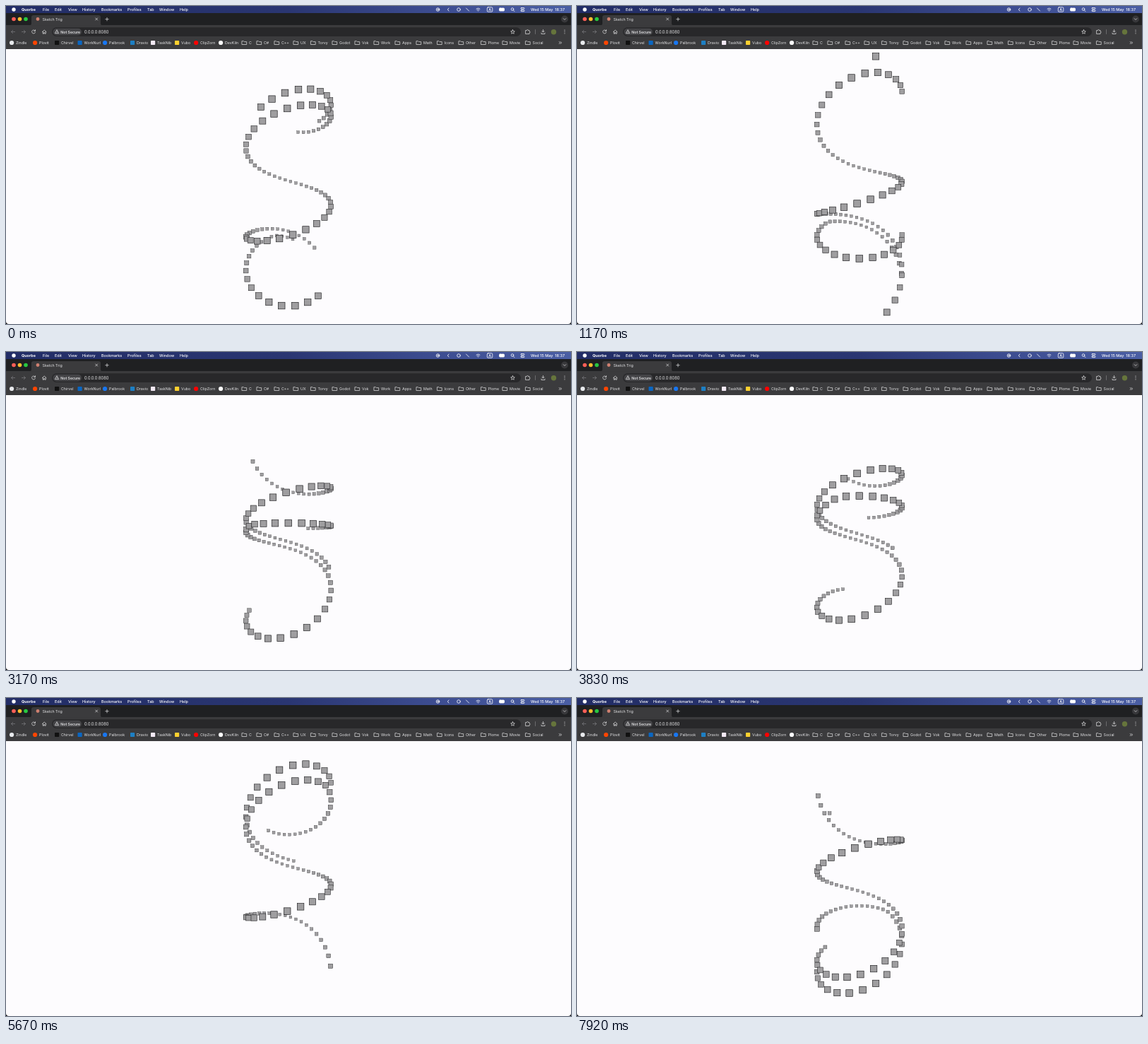
An HTML page with a canvas that plays this animation: 800x450 px, repeating every 8000 ms.

```html
<!DOCTYPE html>
<html lang="en">
<head>
<meta charset="utf-8">
<title>Spiral of squares</title>
<style>
  html, body { margin: 0; width: 100%; height: 100%; overflow: hidden; background: #fdfcfe; }
  svg, canvas { position: absolute; left: 0; top: 0; display: block; }
  text { font: 5.3px Inter, Roboto, sans-serif; fill: #e4e4e6; white-space: pre; }
  .menu text { font-size: 5.45px; fill: #fff; font-weight: 500; }
  .menu .app { font-weight: 700; }
  .line { fill: none; stroke: #d2d2d4; stroke-width: .8; stroke-linecap: round; stroke-linejoin: round; }
  .dim { stroke: #77777a; }
</style>
</head>
<body>
<canvas id="stage" width="800" height="450"></canvas>
<svg width="800" height="450" viewBox="0 0 800 450">
  <defs>
    <linearGradient id="bar">
      <stop offset="0" stop-color="#222d66"/>
      <stop offset=".5" stop-color="#2a3672"/>
      <stop offset=".75" stop-color="#3c4c90"/>
      <stop offset="1" stop-color="#4a5ea4"/>
    </linearGradient>
  </defs>
  <rect width="800" height="10" fill="url(#bar)"/>
  <rect y="10" width="800" height="17.5" fill="#1f2022"/>
  <rect y="27" width="800" height="34" fill="#3b3b3d"/>
  <path d="M33 27.5q3 0 3-3V16q0-3 3-3h92q3 0 3 3v8.500q0 3 3 3z" fill="#3b3b3d"/>

  <g class="menu" id="menu">
    <circle cx="11" cy="5" r="2.7" fill="#fff"/>
    <g class="line" style="stroke:#fff">
      <circle cx="611.500" cy="5" r="2.300"/>
      <circle cx="611.500" cy="5" r=".8"/>
      <path d="M627 3l-1.700 2 1.700 2M651.500 3l4 4M666 4q2.500-2 5 0M667 5.700q1.500-1.200 3 0M668.500 7.200v0"/>
      <circle cx="641" cy="5" r="2.300"/>
      <rect x="681.300" y="1.800" width="7.500" height="6.400" rx="1.300"/>
      <rect x="698.500" y="3" width="7" height="4" rx="1" fill="#fff"/>
      <circle cx="717" cy="4.500" r="1.800"/>
      <path d="M718.400 6l1.500 1.600"/>
      <rect x="729" y="2.500" width="5" height="1.800" rx=".9"/>
      <rect x="729" y="5.800" width="5" height="1.800" rx=".9"/>
    </g>
    <text x="683.200" y="7">A</text>
    <text x="743" y="7">Wed 15 May  18:37</text>
  </g>

  <circle cx="11" cy="18.500" r="2.800" fill="#ff5f57"/>
  <circle cx="19.500" cy="18.500" r="2.800" fill="#febc2e"/>
  <circle cx="28" cy="18.500" r="2.800" fill="#28c840"/>
  <circle cx="45" cy="18.500" r="2.400" fill="#d08070"/>
  <text x="51.500" y="20.500">Sketch Trig</text>
  <path class="line" d="M126.700 17l3 3m0-3l-3 3M143 16.500v4.400m-2.200-2.200h4.400"/>
  <circle cx="791" cy="18.500" r="5" fill="#38383b"/>
  <path class="line" d="M789.200 17.700l1.800 1.800 1.800-1.800"/>

  <path class="line dim" d="M12.500 36.500h-5m2.200-2.200l-2.200 2.200 2.200 2.200M22.500 36.500h5m-2.200-2.200l2.200 2.200-2.200 2.200"/>
  <path class="line" d="M41.200 35a2.500 2.500 0 1 0 .3 2.300M41.500 33.700v1.800h-1.800M51.500 36.500l2.700-2.500 2.700 2.500M52.200 36.200v3h1.300v-1.500h1.400v1.500h1.300v-3"/>
  <rect x="65" y="30.300" width="664" height="12.600" rx="6.300" fill="#28282a"/>
  <rect x="66.500" y="31.700" width="40.500" height="9.800" rx="4.900" fill="#444447"/>
  <path class="line" d="M72.200 34l2.500 4.600h-5zM72.200 36v1"/>
  <text x="77.300" y="38.500" style="font-size:5.200px;font-weight:600">Not Secure</text>
  <text x="111" y="38.600" style="font-size:5.700px">0.0.0.0:8080</text>
  <path class="line" d="M717.500 33.700l.8 1.900 2 .2-1.500 1.400.4 2-1.700-1-1.700 1 .4-2-1.500-1.400 2-.2z"/>
  <path class="line" d="M736 34.500h1.500a1 1 0 0 1 2 0h1.500v1.500a1 1 0 0 1 0 2v1.500h-5z"/>
  <path class="line" d="M749.500 33.500v6" stroke-opacity=".4"/>
  <path class="line" d="M760.500 33.500v3.500m-1.700-1.700l1.700 1.700 1.700-1.700M758 38v1.500h5V38"/>
  <circle cx="775.500" cy="36.800" r="3.700" fill="#66753c"/>
  <path d="M791 34.200v0m0 2.300v0m0 2.300v0" class="line" style="stroke-width:1.200"/>
  <g id="marks"></g>
  <path class="line" d="M783.200 50.500l1.500 1.500-1.500 1.500m2-3l1.500 1.500-1.500 1.500"/>
  <path d="M0 446v4h4q-4 0-4-4zM800 446v4h-4q4 0 4-4z" fill="#000"/>
</svg>
<script>
const NS = 'http://www.w3.org/2000/svg';
const add = (parent, tag, attrs, text = '') => {
  const el = document.createElementNS(NS, tag);
  for (const name in attrs) el.setAttribute(name, attrs[name]);
  el.textContent = text;
  parent.append(el);
};
const byId = id => document.getElementById(id);

const menu = [[22, 'Quorbe'], [52, 'File'], [69, 'Edit'], [88, 'View'], [108, 'History'],
  [135, 'Bookmarks'], [172, 'Profiles'], [200, 'Tab'], [217, 'Window'], [246, 'Help']];
menu.forEach(([x, label], i) =>
  add(byId('menu'), 'text', { x, y: 7, class: i ? '' : 'app' }, label));

// Each site: text position, label, icon colour, icon corner radius.
const ROUND = 3.1, SQUARE = 0.8;
const sites = [[14, 'Zindle', '#e8eaed', ROUND], [47, 'Plovit', '#ff4500', ROUND],
  [78, 'Chirvel', '#111', SQUARE], [110.5, 'WorkNurl', '#0a66c2', SQUARE],
  [146, 'Palbrook', '#1877f2', ROUND], [185, 'Dravio', '#1d7fc4', SQUARE],
  [214, 'TaskNib', '#f3e9f5', SQUARE], [248, 'Vubo', '#ffd02f', SQUARE],
  [275, 'ClipZorn', '#f00', ROUND], [310, 'DevKiln', '#fff', ROUND]];
const folders = [[344, 'C'], [365, 'C#'], [390, 'C++'], [417, 'UX'], [441.5, 'Torvy'],
  [472, 'Godot'], [504, 'Vok'], [531, 'Work'], [561, 'Apps'], [591, 'Math'], [620.5, 'Icons'],
  [651, 'Other'], [682.5, 'Plome'], [713, 'Movie'], [745.5, 'Social']];
const marks = byId('marks');
for (const [x, label, fill, rx] of sites) {
  add(marks, 'rect', { x: x - 9, y: 48.9, width: 6.2, height: 6.2, rx, fill });
  add(marks, 'text', { x, y: 54 }, label);
}
for (const [x, label] of folders) {
  add(marks, 'path', { class: 'line', d: `M${x - 9.7} 49.700h2.200l.9.900h3.300v3.900h-6.400z` });
  add(marks, 'text', { x, y: 54 }, label);
}

// A helix of squares turns and rises; those passing the top re-enter below.
const COUNT = 100, SIDE = 100, RADIUS = 1000, DEPTH = 2000, FOCAL = 300;
const TOP = -2000, CYCLE = 4010;
const SCALE = 800 / 1920, CENTER = { x: 400, y: 255.5 };
const FPS = 12, LOOP = 8000;
const SPIN = 0.05, RISE = 50, START_ANGLE = -1.073, START_Y = 1760;

const mod = (a, n) => (a % n + n) % n;
const wrap = y => mod(y - TOP, CYCLE) + TOP;
const ctx = byId('stage').getContext('2d');

function squareAt(k, step) {
  const angle = START_ANGLE + SPIN * step - 0.2 * (k - 1);
  // The first squares share one height, as a flat ring.
  const offset = Math.max(0, 60 * k - 1000);
  const z = DEPTH + Math.sin(angle) * RADIUS;
  const zoom = SCALE * FOCAL / (FOCAL + z);
  return {
    z,
    size: SIDE * zoom,
    x: CENTER.x + Math.cos(angle) * RADIUS * zoom,
    y: CENTER.y + wrap(START_Y + offset - RISE * step) * zoom
  };
}

function draw(step) {
  ctx.fillStyle = '#fdfcfe';
  ctx.fillRect(0, 0, 800, 450);
  ctx.fillStyle = '#9f9ea0';
  ctx.strokeStyle = '#1c1c1e';
  const squares = Array.from({ length: COUNT }, (_, i) => squareAt(i + 1, step));
  squares.sort((a, b) => b.z - a.z);
  for (const { x, y, size } of squares) {
    const box = [x - size / 2, y - size / 2, size, size];
    ctx.lineWidth = size * 0.07;
    ctx.fillRect(...box);
    ctx.strokeRect(...box);
  }
}

const begin = performance.now();
function tick() {
  const ms = (performance.now() - begin) % LOOP;
  draw(Math.floor((ms + 4) * FPS / 1000));
  requestAnimationFrame(tick);
}
tick();
</script>
</body>
</html>
```
